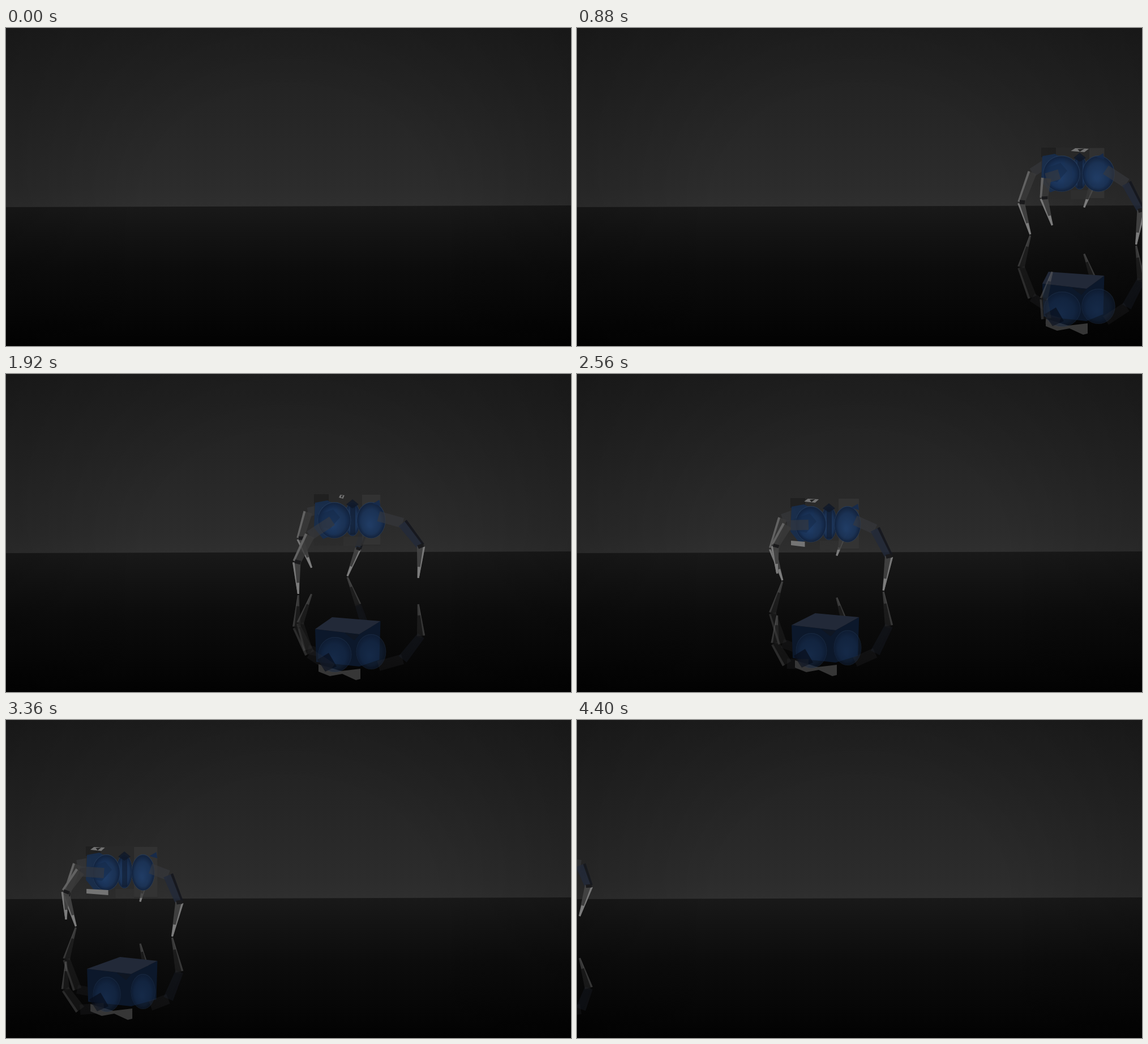
An HTML page with a canvas that plays this animation: 998x561 px, repeating every 4480 ms.

```html
<!DOCTYPE html>
<html>
<head>
<meta charset="utf-8">
<title>Glass walker</title>
<style>
html, body { margin: 0; width: 100%; height: 100%; overflow: hidden; background: #111; }
canvas { display: block; }
</style>
</head>
<body>
<canvas id="stage" width="998" height="561"></canvas>
<script>
const W = 998, H = 561, LOOP = 4480, STEP = 80, STRIDE_TIME = 800, LIFT = 40;
const c = document.getElementById('stage').getContext('2d');

// Key points of the body: time, x, y
const path = [[0, 1126, 256], [880, 888, 256], [1920, 612, 257], [2560, 445, 264],
  [3040, 290, 256], [3760, 108, 283], [4400, -66, 258]];

// Diagonal legs share a beat; x counts from the body centre, drift is the parallax
const farLeft = { beat: -1, stride: 20, drift: 0.015, wide: 8, side: 1,
  hip: [-58, -18], shoulder: [-86, 255], knee: [-108, 308], foot: [-93, 364] };
const farRight = { beat: 1, stride: 35, drift: -0.06, wide: 7, side: -1, blue: true,
  hip: [36, 8], shoulder: [35, 275], knee: [40, 308], foot: [31, 356.5] };
const nearLeft = { beat: 1, stride: 35, drift: 0.05, wide: 9, side: 1,
  hip: [-36, 2], shoulder: [-66, 285], knee: [-78, 332], foot: [-68, 388] };
const nearRight = { beat: -1, stride: 32, drift: 0.05, wide: 9, side: -1, blue: true,
  hip: [46, -6], shoulder: [76, 274], knee: [94, 322], foot: [80, 382] };

const mix = (a, b, u) => a.map((v, i) => v + (b[i] - v) * u);

function poly(points, fill) {
  c.beginPath();
  points.forEach(([x, y]) => c.lineTo(x, y));
  c.closePath();
  c.fillStyle = fill;
  c.fill();
}

const box = (l, t, r, b, fill) => poly([[l, t], [r, t], [r, b], [l, b]], fill);

// A tapered slab; from and to select a strip across its width
function slab(a, b, wa, wb, fill, from = -1, to = 1) {
  const dx = b[0] - a[0], dy = b[1] - a[1], d = Math.hypot(dx, dy) || 1;
  const at = (p, w) => [p[0] - dy / d * w, p[1] + dx / d * w];
  poly([at(a, wa * from), at(a, wa * to), at(b, wb * to), at(b, wb * from)], fill);
}

function ball(x, y, rx, ry) {
  c.save();
  c.translate(x, y);
  c.scale(rx, ry);
  const g = c.createRadialGradient(-0.1, 0.25, 0.1, 0, 0, 1);
  g.addColorStop(0, 'rgba(31,60,102,.95)');
  g.addColorStop(0.65, 'rgba(25,50,87,.93)');
  g.addColorStop(0.95, 'rgba(17,34,62,.92)');
  g.addColorStop(1, 'rgba(42,66,98,.9)');
  c.fillStyle = g;
  c.beginPath();
  c.arc(0, 0, 1, 0, 7);
  c.fill();
  c.restore();
}

function backdrop() {
  let g = c.createLinearGradient(0, 0, 0, 315);
  g.addColorStop(0, '#1f1f1f');
  g.addColorStop(0.5, '#262626');
  g.addColorStop(0.9, '#2c2c2c');
  g.addColorStop(1, '#2f2f2f');
  c.fillStyle = g;
  c.fillRect(0, 0, W, H);
  g = c.createLinearGradient(0, 314, 0, H);
  g.addColorStop(0, '#191919');
  g.addColorStop(0.2, '#131313');
  g.addColorStop(0.45, '#0c0c0c');
  g.addColorStop(0.75, '#070707');
  g.addColorStop(1, '#020202');
  poly([[0, 316], [W, 313], [W, H], [0, H]], g);
  c.save();
  c.translate(W / 2, 315);
  c.scale(1, 0.8);
  g = c.createRadialGradient(0, 0, 250, 0, 0, 640);
  g.addColorStop(0, 'rgba(0,0,0,0)');
  g.addColorStop(1, 'rgba(0,0,0,.23)');
  c.fillStyle = g;
  c.fillRect(-W / 2, -400, W, 720);
  c.restore();
}

function drawLeg(leg, cx, cy, phase, mirror) {
  const lift = LIFT * Math.sqrt(Math.max(0, leg.beat * Math.cos(phase)));
  const swing = leg.drift * (cx - W / 2) - leg.beat * leg.stride * Math.sin(phase);
  const at = ([x, y], sway = 0, rise = 0) => {
    const py = y - lift * rise;
    return [cx + x + swing * sway, mirror ? 2 * leg.foot[1] + 2 - py : py];
  };
  const hip = at([leg.hip[0], cy + leg.hip[1]]);
  const shoulder = at(leg.shoulder, 0.35, 0.5);
  const knee = at(leg.knee, 0.75, 0.8);
  const foot = at(leg.foot, 1, 1);
  const w = leg.wide, s = leg.side * (mirror ? -1 : 1);

  slab(hip, shoulder, w, w, 'rgba(56,58,62,.6)');
  slab(shoulder, knee, w, w * 0.8, leg.blue ? 'rgba(34,42,58,.8)' : 'rgba(58,58,58,.8)');
  slab(shoulder, knee, w, w * 0.8, leg.side > 0 ? '#626262' : 'rgba(18,18,20,.7)', 0.5 * s, s);
  slab(knee, foot, w * 0.8, 1.5, 'rgba(68,68,68,.9)');
  slab(knee, foot, w * 0.8, 1.5, '#787878', 0.5 * s, s);
  slab(mix(knee, foot, 0.65), foot, w * 0.3, 1.5, '#7c7c7c');
  slab(mix(knee, shoulder, 0.08), mix(knee, foot, 0.05), w * 0.8, w * 0.75, '#1a1a1c', -0.9, 0.6);
}

function drawBody(cx, cy, phase) {
  const view = cx - W / 2;
  const right = 52 - 0.022 * view;
  const strip = (cy - 257) * 3.5;
  const glint = 0.07 * view - 27, g = 16 * Math.abs(Math.cos(phase));
  c.save();
  c.translate(cx, cy);
  box(-68, -45, right, 46, 'rgba(42,42,42,.55)');
  box(-68, -45, -42, -28, 'rgba(22,22,22,.45)');
  box(17, -44, right, 44, 'rgba(64,64,64,.4)');
  box(-16, 30, 17, 46, 'rgba(56,56,56,.35)');
  poly([[-66, -30], [-44, -34], [-26, -24], [-28, 25], [-52, 34], [-68, 14]], 'rgba(23,46,80,.85)');
  ball(0, -1, 14, 30);
  box(-4, -26, 5, 26, 'rgba(15,26,44,.6)');
  ball(-32, 1, 28 + 0.012 * view, 32);
  ball(33, 1, 24 + 0.012 * view, 32);
  poly([[-11, -27], [0, -36], [11, -27], [0, -20]], 'rgba(17,25,40,.85)');
  poly([[-62, -8], [-34, -18], [-22, -4], [-40, 16], [-58, 12]], 'rgba(20,40,70,.5)');
  poly([[right - 14, -28], [right - 2, -35], [right, -24]], 'rgba(21,42,76,.9)');
  if (strip > 1) poly([[-67, 30], [strip - 67, 32], [strip - 67, 41], [-67, 38]], '#747474');
  poly([[glint - g, -39], [glint - g / 2, -44], [glint + g, -43], [glint + g / 2, -37]], '#727272');
  poly([[glint - g / 4, -42], [glint + g / 2, -43], [glint, -38]], '#202020');
  c.restore();
}

function drawBodyMirror(cx, cy) {
  const view = cx - W / 2;
  const right = 52 - 0.022 * view, back = -28 - 0.07 * view;
  c.save();
  c.translate(cx, 747 - cy);
  poly([[-60, 22], [-60, 35], [-40, 43], [-18, 39], [6, 50], [14, 48], [14, 30], [-20, 34]], '#363636');
  poly([[-66, -40], [12, -31], [right, -54], [right - 2, 14], [12, 26], [-64, 18]], '#0c182b');
  c.globalAlpha = 0.5;
  ball(-31, 5, 28 + 0.012 * view, 31);
  ball(33, 0, 25 + 0.012 * view, 31);
  c.globalAlpha = 1;
  poly([[back, -61], [right, -54], [12, -31], [-66, -40]], '#222938');
  poly([[-14, -33], [12, -30], [3, -20]], '#0f1622');
  poly([[-62, 14], [-42, 2], [-28, 26], [-48, 35]], 'rgba(8,14,26,.7)');
  c.restore();
}

function render(t) {
  let i = 0;
  while (i < path.length - 2 && t >= path[i + 1][0]) i++;
  const [t0] = path[i], [t1] = path[i + 1];
  const [, cx, cy] = mix(path[i], path[i + 1], (t - t0) / (t1 - t0));
  const phase = 2 * Math.PI * (t - 880) / STRIDE_TIME;
  const legs = (pair, mirror) => {
    c.globalAlpha = mirror ? 0.3 : 1;
    pair.forEach(leg => drawLeg(leg, cx, cy, phase, mirror));
    c.globalAlpha = 1;
  };
  const far = [farLeft, farRight], near = [nearLeft, nearRight];

  backdrop();
  legs(far, true);
  drawBodyMirror(cx, cy);
  legs(near, true);
  legs(far, false);
  drawBody(cx, cy, phase);
  legs(near, false);
}

const start = performance.now();
function tick() {
  const t = (performance.now() - start) % LOOP;
  render(Math.floor(t / STEP) * STEP);
  requestAnimationFrame(tick);
}
tick();
</script>
</body>
</html>
```
